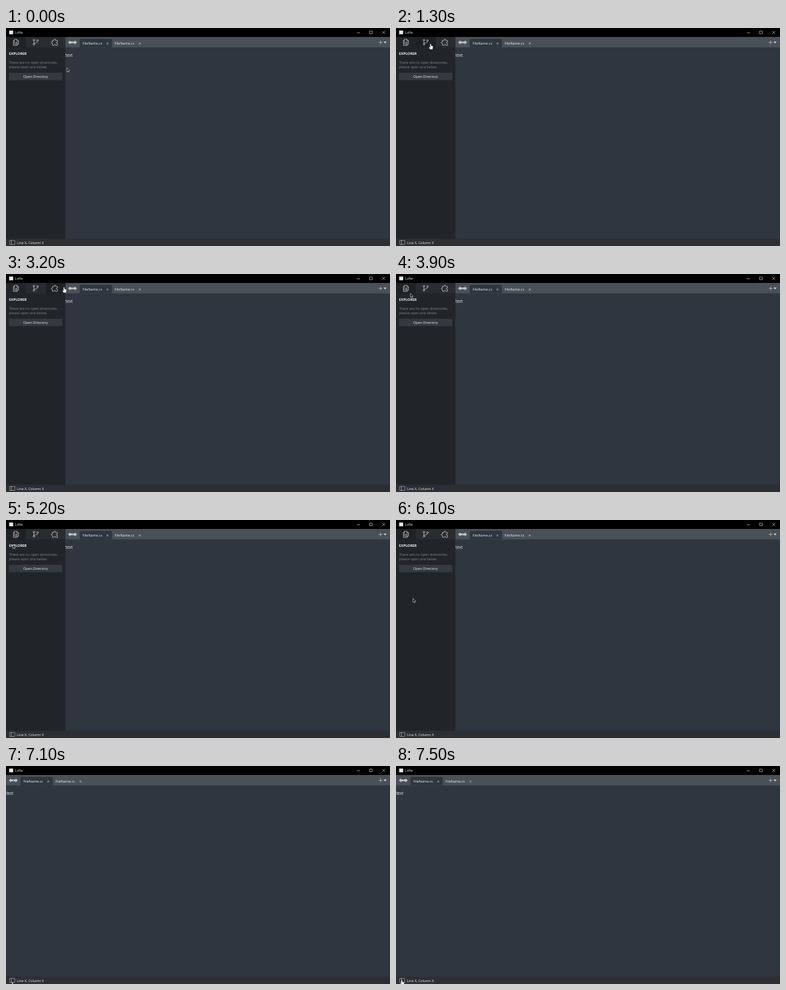
Write an HTML page that moves like this. It is 600 by 341 pixels and loops after 8 s.

```html
<!DOCTYPE html>
<html lang="en">
<head>
<meta charset="utf-8">
<title>Code editor</title>
<style>
  html, body { margin: 0; width: 100%; height: 100%; overflow: hidden; background: #2f3640; }
  svg { display: block; width: 600px; height: 341px; }
  text { font: 5.45px "Open Sans", "Noto Sans", sans-serif; fill: #eceeef; white-space: pre; }
  .line { fill: none; stroke: #d5d7d9; stroke-width: .65; stroke-linejoin: round; stroke-linecap: round; }
</style>
</head>
<body>
<svg viewBox="0 0 600 341">
  <rect width="600" height="341" fill="#2f3640"/>
  <rect y="14" width="600" height="16.3" fill="#495057"/>

  <!-- editor tabs and text -->
  <g id="editor">
    <path d="M115.3 30.4V19q0-2 2-2h46.4q2 0 2 2v11.4z" fill="#2f3640"/>
    <path id="arrow" d="M97 22.5l3.6-3.3v1.9h3.2v2.8h-3.2v1.9z" fill="#bfc3c6"/>
    <use href="#arrow" transform="matrix(-1 0 0 1 208 0)"/>
    <text x="119.8" y="25.9">FileName.cs</text>
    <text x="169.8" y="25.9">FileName.cs</text>
    <path id="cross" class="line" d="M157.4 23l2.4 2.4m0-2.4l-2.4 2.4"/>
    <use href="#cross" x="50.4"/>
    <text x="93" y="44.6" style="font-size:6.3px">text</text>
  </g>
  <path class="line" d="M582.8 22.5h5m-2.5-2.5v5"/>
  <path d="M589.8 21.3h5l-2.5 2.7z" fill="#d5d7d9"/>

  <!-- explorer -->
  <g id="sidebar">
    <rect y="14" width="92.6" height="316" fill="#212529"/>
    <rect x="31" y="14" width="61.6" height="16.5" fill="#292d31"/>
    <rect id="hover" y="14" width="31" height="16.5" fill="#1e2225"/>
    <g class="line">
      <path d="M13.4 17.6h3.6l2.6 2.6v5.2h-6.2zM16.9 17.7v2.6h2.6M13.2 19.4h-1.6v8h6v-1.8M15 22.3h3M15 23.8h3"/>
      <circle cx="43.6" cy="18.9" r="1.3"/>
      <circle cx="49.2" cy="19.6" r="1.3"/>
      <circle cx="43.6" cy="25.6" r="1.3"/>
      <path d="M43.6 20.2v4.1M49.2 20.9q0 2.2-2.7 2.2-2.9 0-2.9 1.2"/>
      <path d="M72.6 19.4h2.6q-.7-2.1 1.1-2.1t1.1 2.1h3v2.4q-1.9-.6-1.9 1t1.9 1v3.3h-2.8q.3-1.6-1.1-1.6t-1.1 1.6h-2.8v-3.2q-1.9.5-1.9-1.1t1.9-1.1z"/>
    </g>
    <text x="4.8" y="42.4" style="font-weight:700">EXPLORER</text>
    <g style="opacity:.48">
      <text x="4.8" y="55.7">There are no open directories,</text>
      <text x="4.8" y="62.8">please open one below.</text>
    </g>
    <rect x="4.6" y="70" width="83.2" height="11.6" fill="#343a40"/>
    <text x="46.3" y="78.1" text-anchor="middle">Open Directory</text>
  </g>

  <!-- status bar -->
  <rect y="329.5" width="600" height="11.5" fill="#2b2f33"/>
  <path class="line" d="M6.2 332.3h7.6v6.2H6.2zM8.6 332.3v6.2" opacity=".8"/>
  <text x="17" y="337.6">Line X, Column X</text>

  <!-- title bar -->
  <rect width="600" height="14" fill="#000"/>
  <rect x="5" y="4" width="6.2" height="5.8" fill="#e8e8e8"/>
  <text x="14" y="9" style="font-size:5.1px">Lofte</text>
  <path class="line" d="M548.8 7.5h3.8M568.3 4.9h4v4h-4zM588.2 4.9l4 4m0-4l-4 4"/>

  <g id="cursor">
    <path id="pointer" d="M0 .3V6.6L1.5 5.3 2.4 7.3 3.3 6.9 2.5 5H4.4z" fill="#15181b" stroke="#d5d7d9" stroke-width=".6"/>
    <path id="hand" d="M-.9 .8Q0-.5 .9 .8V3.2L3 3.6Q4 3.9 3.9 5L3.2 9H-.8L-2.6 6Q-2.6 4.8-.9 5.8z" fill="#fff" stroke="#111" stroke-width=".35"/>
  </g>
</svg>
<script>
const LOOP = 8000, STEP = 100, COLLAPSE = 7100;

const start = { x: 95, y: 62 };
const moves = [
  { from: 200, to: 800, x: 38, y: 19 },     // second sidebar tab
  { from: 1200, to: 1300, x: 54, y: 24.5 },
  { from: 1300, to: 2100, x: 75, y: 33 },   // below the third tab
  { from: 2100, to: 2400, x: 76, y: 21 },
  { from: 3100, to: 3400, x: 120, y: 19 },  // editor tabs
  { from: 3500, to: 3900, x: 22.5, y: 30 }, // back to the first tab
  { from: 3900, to: 4100, x: 35, y: 19 },
  { from: 4600, to: 5000, x: 53, y: 19 },
  { from: 5100, to: 5200, x: 10.5, y: 38 },
  { from: 5200, to: 5700, x: 30, y: 74 },   // directory button
  { from: 5900, to: 7000, x: 10.5, y: 339 },
  { from: 7000, to: 7500, x: 9, y: 334.3 }  // sidebar toggle
];

const el = id => document.getElementById(id);
const show = (id, on) => el(id).setAttribute("visibility", on ? "visible" : "hidden");
const inside = ({ x, y }, l, t, r, b) => x >= l && x < r && y >= t && y < b;

function mouseAt(t) {
  return moves.reduce((p, m) => {
    const k = Math.min(1, Math.max(0, (t - m.from) / (m.to - m.from)));
    return { x: p.x + (m.x - p.x) * k, y: p.y + (m.y - p.y) * k };
  }, start);
}

function draw() {
  const t = Math.floor(performance.now() % LOOP / STEP) * STEP;
  const open = t < COLLAPSE;
  const mouse = mouseAt(t);
  const onTab = open && inside(mouse, 0, 14, 92.6, 30);
  const onButton = open && inside(mouse, 4.6, 70, 87.8, 81.6);
  const hand = onTab || onButton || inside(mouse, 5, 331, 15, 339);

  el("sidebar").style.display = open ? "" : "none";
  el("editor").setAttribute("transform", `translate(${open ? 0 : -92.6})`);
  el("hover").setAttribute("x", onTab ? Math.floor(mouse.x / 31) * 31 : 0);
  el("cursor").setAttribute("transform", `translate(${mouse.x} ${mouse.y})`);
  show("hand", hand);
  show("pointer", !hand);
  requestAnimationFrame(draw);
}
draw();
</script>
</body>
</html>
```
